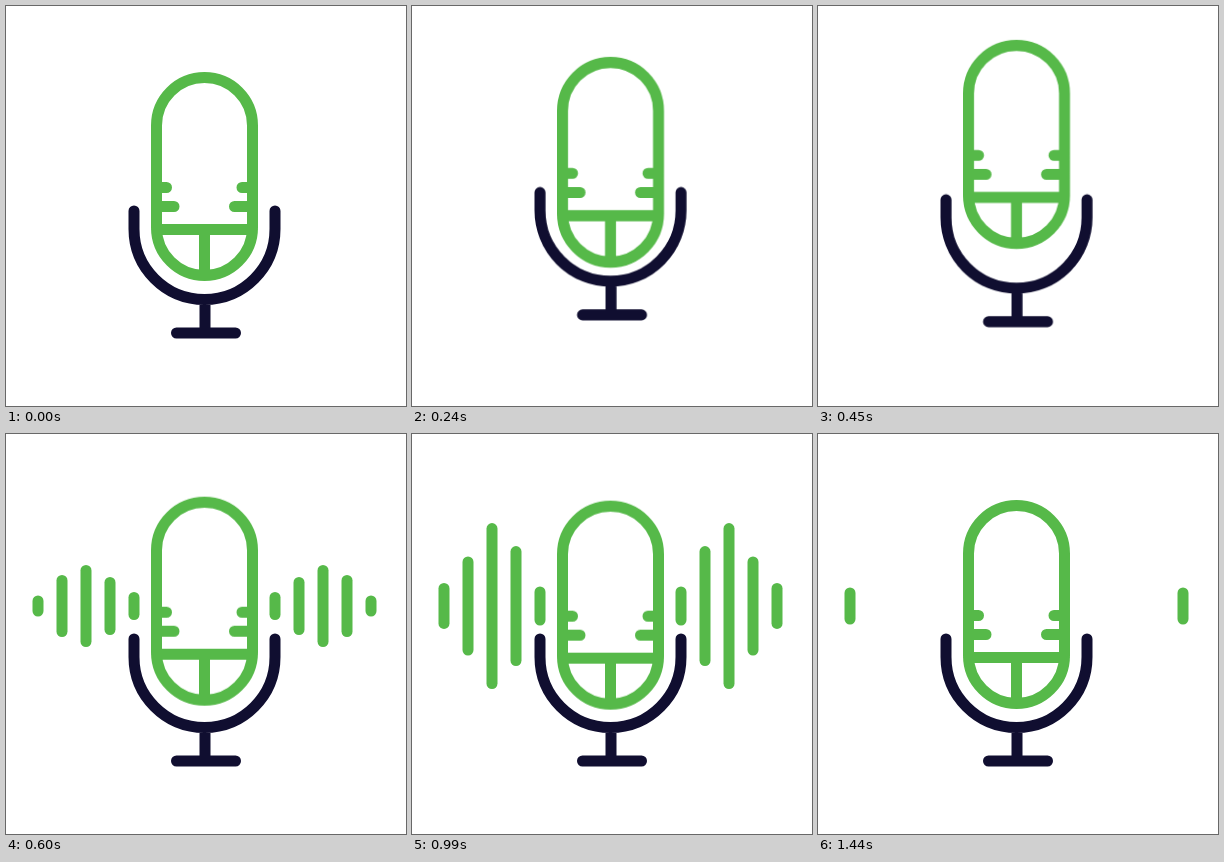
Write an HTML page without scripts that moves like this. It is 400 by 400 pixels and loops after 1.47 s.

```html
<!DOCTYPE html>
<html lang="en">
<head>
<meta charset="utf-8">
<title>Microphone</title>
<style>
  :root { --green: #56b949; --navy: #100e30; --loop: 1470ms infinite; }
  html, body { margin: 0; width: 100%; height: 100%; overflow: hidden; background: #fff; }
  .stage { position: relative; width: 400px; height: 400px; overflow: hidden; }
  svg { position: absolute; inset: 0; }
  path { fill: none; stroke-width: 11; stroke-linecap: round; stroke-linejoin: round; }
  .body { stroke: var(--green); transform-origin: 198.5px 170px; animation: body var(--loop); }
  .stand { stroke: var(--navy); transform-origin: 198.5px 265px; animation: stand var(--loop); }

  /* Both wave groups share the mirror axis x = 198.5 */
  .waves { position: absolute; top: 172px; left: 0; width: 397px; }
  .mirrored { transform: scaleX(-1); }
  .waves i {
    position: absolute; width: 11px; height: 0; border-radius: 5.5px;
    background: var(--green); transform: translate(-50%, -50%);
    animation: var(--loop) ease-in-out;
  }
  .waves i:nth-child(1) { left: 32px; animation-name: wave1; }
  .waves i:nth-child(2) { left: 56px; animation-name: wave2; }
  .waves i:nth-child(3) { left: 80px; animation-name: wave3; }
  .waves i:nth-child(4) { left: 104px; animation-name: wave4; }
  .waves i:nth-child(5) { left: 128px; animation-name: wave5; }

  @keyframes stand {
    0% { transform: none; animation-timing-function: cubic-bezier(.4, 0, .75, .8); }
    10.2% { transform: translateY(-13px) scaleY(1.015); animation-timing-function: ease-out; }
    21% { transform: translateY(-20px); }
    24.5% { transform: translateY(-20px); animation-timing-function: ease-in; }
    34.7%, 100% { transform: none; }
  }
  @keyframes body {
    0% { transform: none; animation-timing-function: cubic-bezier(.4, 0, .75, .8); }
    10.2% { transform: translateY(-9.5px) scaleY(1.015); animation-timing-function: linear; }
    24.5% { transform: translateY(-20.5px); animation-timing-function: ease-out; }
    29.6% { transform: translateY(-34px); animation-timing-function: ease-in; }
    35.4% { transform: none; animation-timing-function: ease-out; }
    40.8% { transform: translateY(-3.3px); animation-timing-function: ease-in-out; }
    52% { transform: translateY(3px); animation-timing-function: ease-in-out; }
    57.1% { transform: translateY(2.3px); animation-timing-function: ease-in-out; }
    73.5%, 100% { transform: none; }
  }
  @keyframes wave1 {
    0%, 38.6% { height: 0; }
    40.8% { height: 21px; }
    57.1% { height: 44px; }
    81.6%, 90% { height: 50px; }
    98%, 100% { height: 37px; }
  }
  @keyframes wave2 {
    0%, 37.4% { height: 0; }
    40.8% { height: 62px; }
    57.1% { height: 88px; }
    70% { height: 100px; }
    81.6% { height: 84px; }
    95%, 100% { height: 0; }
  }
  @keyframes wave3 {
    0%, 35.5% { height: 0; }
    40.8% { height: 82px; }
    57.1% { height: 143px; }
    70% { height: 168px; }
    81.6% { height: 99px; animation-timing-function: linear; }
    92%, 100% { height: 0; }
  }
  @keyframes wave4 {
    0%, 35.5% { height: 0; }
    40.8% { height: 58px; }
    57.1% { height: 117px; }
    68% { height: 120px; }
    81.6% { height: 65px; animation-timing-function: linear; }
    89.5%, 100% { height: 0; }
  }
  @keyframes wave5 {
    0%, 35.5% { height: 0; }
    40.8% { height: 28px; }
    57.1%, 81.6% { height: 39px; }
    88%, 100% { height: 0; }
  }
</style>
</head>
<body>
<div class="stage">
  <svg width="400" height="400" viewBox="0 0 400 400">
    <path class="stand" d="M128 205V223A70.5 70.5 0 0 0 269 223V205M199 293.5V327M170.500 327H229.500"/>
    <path class="body" d="M150.500 119.500a48 48 0 0 1 96 0v102a48 48 0 0 1-96 0zM150.500 223.500h96M198.500 223.500v46M150.500 181.500h10M150.500 200.500h17.500M246.500 181.500h-10.500M246.500 200.500h-18"/>
  </svg>
  <div class="waves"><i></i><i></i><i></i><i></i><i></i></div>
  <div class="waves mirrored"><i></i><i></i><i></i><i></i><i></i></div>
</div>
</body>
</html>
```
